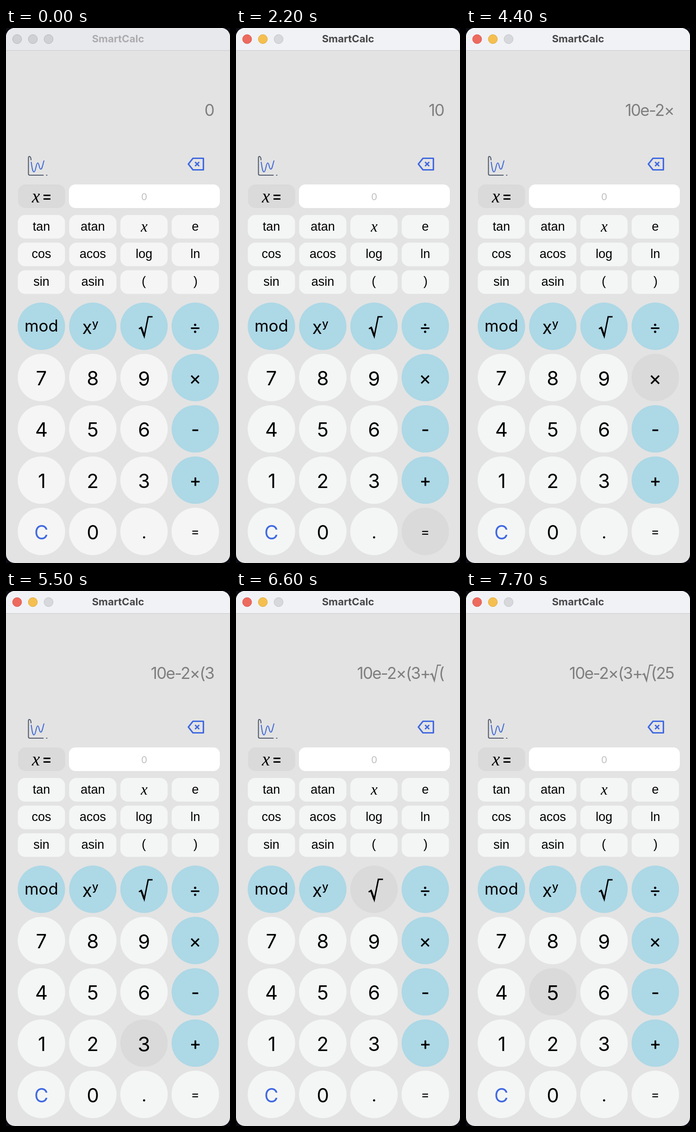
Animation, 484 px wide and 1156 px high, one loop 8000 ms. Source, as an HTML page with a canvas:

```html
<!DOCTYPE html>
<html lang="en">
<head>
<meta charset="utf-8">
<title>Calculator</title>
<style>
  html, body { margin: 0; width: 484px; height: 1156px; overflow: hidden; background: #0b0c14; }
  canvas { display: block; }
</style>
</head>
<body>
<canvas id="stage" width="484" height="1156"></canvas>
<script>
const ctx = document.getElementById('stage').getContext('2d');
const LOOP = 8000, STEP = 550;
const UI = 'Inter, Roboto, sans-serif';
const HELV = '"Liberation Sans", sans-serif';
const SERIF = '"Liberation Serif", serif';
const BLUE = '#4169e1', LIGHT = '#add8e6', PRESSED = '#dadada', GREY = '#7f7f7f';
const COLS = [76.5, 187.5, 298.2, 409];

// Key pressed at each step; the display gains the matching character.
const PRESSES = ['', '', '1', '0', '=', 'e', '-', '2', '×', '(', '3', '+', '√', '2', '5'];
const ROWS = [
  ['mod', 'xy', '√', '÷'],
  ['7', '8', '9', '×'],
  ['4', '5', '6', '-'],
  ['1', '2', '3', '+'],
  ['C', '0', '.', '=']
];
const FUNCS = [
  ['tan', 'atan', 'x', 'e'],
  ['cos', 'acos', 'log', 'ln'],
  ['sin', 'asin', '(', ')']
];

function expression(step) {
  const typed = PRESSES.slice(0, step + 1).filter(k => k !== '=').join('');
  return typed.replace('√', '√(') || '0';
}

function box(x, y, w, h, r, fill) {
  ctx.beginPath();
  ctx.roundRect(x, y, w, h, r);
  ctx.fillStyle = fill;
  ctx.fill();
}

function disc(x, y, r, fill, edge) {
  ctx.beginPath();
  ctx.arc(x, y, r, 0, Math.PI * 2);
  ctx.fillStyle = fill;
  ctx.fill();
  if (edge) {
    ctx.strokeStyle = edge;
    ctx.lineWidth = 1;
    ctx.stroke();
  }
}

function text(str, x, y, font, color = '#000', align = 'center') {
  ctx.font = font;
  ctx.fillStyle = color;
  ctx.textAlign = align;
  ctx.fillText(str, x, y);
}

// Centres the ink of a symbol on a point.
function symbol(str, x, y, font, color) {
  ctx.font = font;
  ctx.textAlign = 'center';
  const m = ctx.measureText(str);
  const dx = (m.actualBoundingBoxLeft - m.actualBoundingBoxRight) / 2;
  const dy = (m.actualBoundingBoxAscent - m.actualBoundingBoxDescent) / 2;
  text(str, x + dx, y + dy, font, color);
}

function line(d, color, width, cap = 'round') {
  ctx.strokeStyle = color;
  ctx.lineWidth = width;
  ctx.lineCap = cap;
  ctx.lineJoin = cap === 'round' ? 'round' : 'miter';
  ctx.stroke(new Path2D(d));
}

// Radical sign, with its top left corner at x, y.
function radical(x, y, scale, color) {
  ctx.save();
  ctx.translate(x, y);
  ctx.scale(scale, scale);
  line('M0.5 27.5 L5.5 24.5 L12 43.5 L20.5 1.5 L30 1.5', color, 3, 'butt');
  line('M5.5 25 L12 43', color, 4, 'butt');
  ctx.restore();
}

function titleBar(active) {
  ctx.fillStyle = active ? '#f1f2f6' : '#e8e9ed';
  ctx.fillRect(0, 0, 484, 48);
  ctx.fillStyle = '#c8c8ca';
  ctx.fillRect(0, 48, 484, 1);
  const lights = active
    ? [['#ed6a5e', '#d9584d'], ['#f5bf4f', '#dca83e'], ['#d7d8dc', '#c2c3c6']]
    : Array(3).fill(['#cfd0d3', '#b6b6b9']);
  lights.forEach(([fill, edge], i) => disc(24 + 34 * i, 24, 9.8, fill, edge));
  text('SmartCalc', 242, 31, '700 22px ' + UI, active ? '#474749' : '#acacae');
}

function display(str) {
  const font = '400 35px ' + UI, y = 190;
  const [left, right] = str.split('√');
  let x = 449;
  const put = part => {
    ctx.font = font;
    x -= ctx.measureText(part).width;
    text(part, x, y, font, GREY, 'left');
  };
  ctx.letterSpacing = '-1.8px';
  if (right !== undefined) {
    put(right);
    x -= 19;
    radical(x, 159, 0.8, GREY);
  }
  put(left);
  ctx.letterSpacing = '0px';
}

function icons() {
  line('M54 285 Q54 278 50.5 277.5 Q48.5 277.5 48.5 281 V315 Q48.5 318 51.5 318 H80.5 M87.5 318 H88.5', '#515a6b', 2.1);
  line('M54.5 290 C56 299 57 311 60.5 311 C64.5 311 65 291.5 68.5 291.5 C72 291.5 71.5 305 75 305 C78.5 305 79.5 294 82 287', '#426ad6', 2.1);
  line('M394 294 L404 281.5 H426.5 V306.5 H404 Z', BLUE, 3.2);
  line('M408.5 289.5 L417.5 298.5 M417.5 289.5 L408.5 298.5', BLUE, 3, 'butt');
}

function inputRow() {
  box(26, 338, 102, 51, 16, PRESSED);
  symbol('x', 64.5, 367.5, 'italic 39px ' + SERIF);
  symbol('=', 88.5, 365.5, '500 33px ' + UI);
  box(136, 338, 326, 51, 14, '#fff');
  text('0', 298.5, 372, '22px ' + HELV, '#bfbfbf');
}

function funcKey(label, x, y, fill, down) {
  box(x - 51, y, 102, 51, 16, down ? PRESSED : fill);
  if (label === 'x') symbol('x', x, y + 27.5, 'italic 33px ' + SERIF);
  else if ('()'.includes(label)) symbol(label, x, y + 25.5, '27px ' + HELV);
  else text(label, x, y + 33.5, '27px ' + HELV);
}

function keyLabel(label) {
  switch (label) {
    case 'mod':
      text('mod', 0, 11.5, '400 35px ' + UI);
      break;
    case 'xy':
      text('x', -12, 16, '400 39px ' + UI);
      text('y', 5.5, 2, '500 24px ' + UI);
      break;
    case '√': radical(-11.5, -22, 1, '#000'); break;
    case '÷': symbol('÷', 0, 4, '400 40px ' + UI); break;
    case '×': symbol('×', 0, 4, '400 41px ' + UI); break;
    case '-': symbol('-', 0, 3, '500 39px ' + UI); break;
    case '+': symbol('+', 0, 3.5, '500 38px ' + UI); break;
    case '=': symbol('=', 0, 2.5, '400 28px ' + UI); break;
    case '.': symbol('.', 0, 13, '400 36px ' + UI); break;
    default: symbol(label, 0, 1.3, '400 42px ' + UI, label === 'C' ? BLUE : '#000');
  }
}

function roundKey(label, x, y, fill, down) {
  disc(x, y, 51.2, down ? PRESSED : fill);
  ctx.save();
  ctx.translate(x, y);
  if (down) ctx.scale(1.05, 1.05);
  keyLabel(label);
  ctx.restore();
}

function draw(time) {
  const step = Math.min(Math.floor((time % LOOP) / STEP), PRESSES.length - 1);
  const active = step > 0;
  const pressed = PRESSES[step];
  const pale = active ? '#f4f6f6' : '#f5f5f5';

  ctx.fillStyle = '#0b0c14';
  ctx.fillRect(0, 0, 484, 1156);
  ctx.save();
  ctx.beginPath();
  ctx.roundRect(0, 0, 484, 1156, 19);
  ctx.clip();
  ctx.fillStyle = '#e3e3e3';
  ctx.fillRect(0, 0, 484, 1156);
  titleBar(active);
  display(expression(step));
  icons();
  inputRow();
  FUNCS.forEach((row, r) => row.forEach((label, c) =>
    funcKey(label, COLS[c], 404 + 59.7 * r, pale, label === pressed)));
  ROWS.forEach((row, r) => row.forEach((label, c) => {
    const operator = r === 0 || (c === 3 && r < 4);
    roundKey(label, COLS[c], 644.5 + 110.8 * r, operator ? LIGHT : pale, label === pressed);
  }));
  ctx.restore();
}

const start = performance.now();
function tick() {
  draw(performance.now() - start);
  requestAnimationFrame(tick);
}
tick();
</script>
</body>
</html>
```
